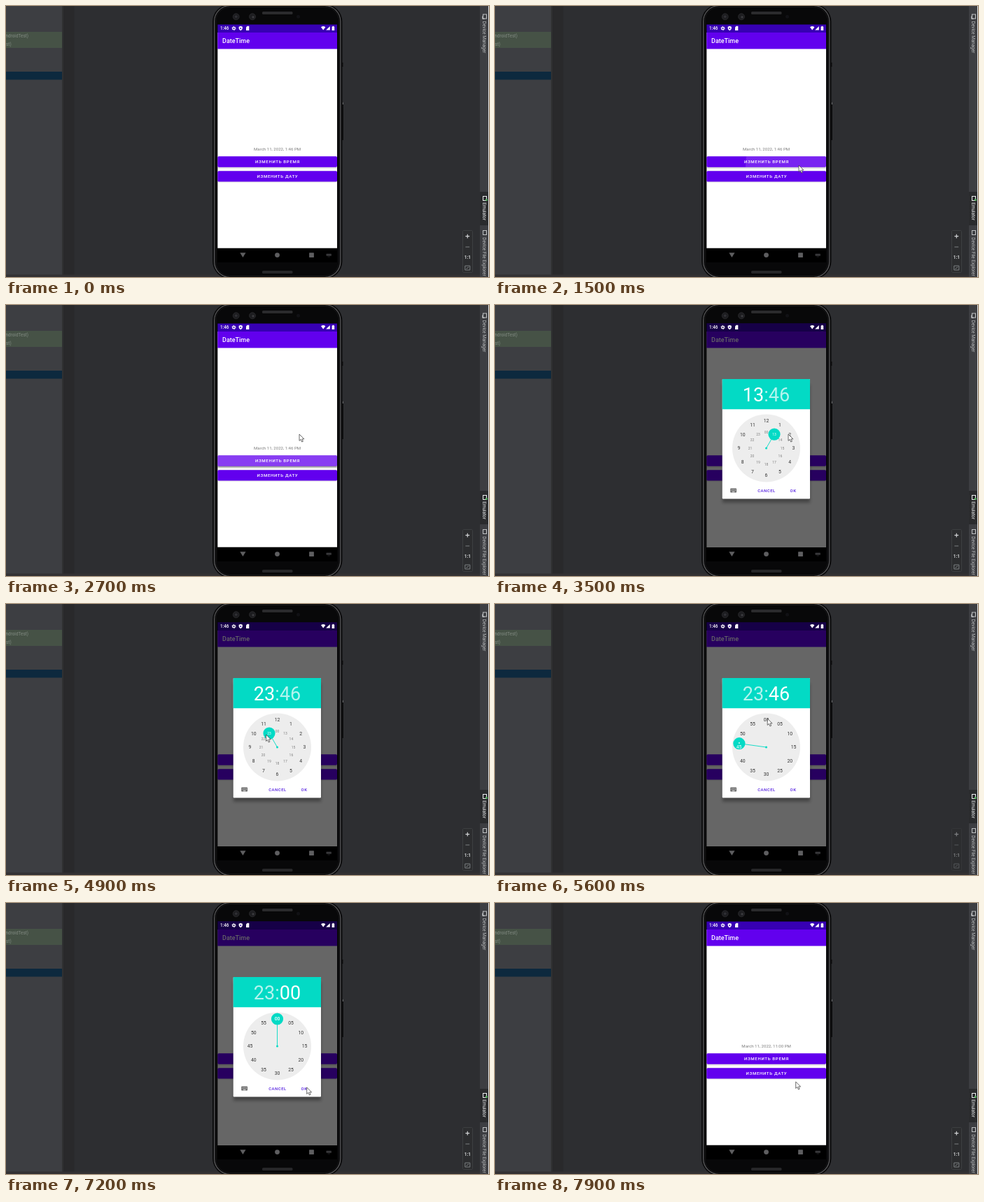
An HTML page for the animation above (8000 ms loop, 690 px wide and 388 px high).

```html
<!DOCTYPE html>
<html lang="ru">
<head>
<meta charset="utf-8">
<title>DateTime</title>
<style>
html, body { margin: 0; width: 100%; height: 100%; overflow: hidden; background: #2d2e31; }
svg { display: block; width: 690px; height: 388px; }
text { font-family: Roboto, sans-serif; }
.mid { text-anchor: middle; }
.btn { font-size: 6.1px; font-weight: 500; letter-spacing: .65px; fill: #fff; }
.act { font-size: 5.9px; font-weight: 500; letter-spacing: .57px; fill: #531de0; }
.ide { font-size: 6.4px; }
</style>
</head>
<body>
<svg viewBox="0 0 690 388" xmlns="http://www.w3.org/2000/svg">
  <defs>
    <clipPath id="stage"><rect width="690" height="388"/></clipPath>
    <clipPath id="btnClip"><rect x="302.3" y="215.3" width="170.7" height="15.4" rx="1.7"/></clipPath>
    <filter id="soft" x="-20%" y="-20%" width="140%" height="140%"><feGaussianBlur stdDeviation="2"/></filter>
    <filter id="soft1" x="-5%" y="-40%" width="110%" height="180%"><feGaussianBlur stdDeviation=".8"/></filter>
  </defs>
  <g clip-path="url(#stage)">
    <!-- IDE window -->
    <rect width="690" height="388" fill="#2d2e31"/>
    <rect width="80" height="388" fill="#3d3e42"/>
    <rect x="80" width="2" height="388" fill="#303132"/>
    <rect x="82" width="15.5" height="388" fill="#29292b"/>
    <rect y="37" width="80" height="23" fill="#465246"/>
    <rect y="94" width="80" height="11.5" fill="#0d293e"/>
    <text class="ide" x="32" y="45" text-anchor="end" fill="#818a82">ndroidTest)</text>
    <text class="ide" x="0" y="56.8" fill="#818a82">st)</text>
    <rect y="384.5" width="690" height="3.5" fill="#333133"/>
    <rect x="677" width="13" height="388" fill="#3d3e42"/>
    <rect x="677" y="266" width="13" height="48" fill="#2a2b2d"/>
    <g id="tabs"></g>
    <rect x="689" width="1" height="388" fill="#e4e4e4"/>
    <g id="zoom">
      <rect x="652.5" y="321.5" width="14" height="60" rx="1" fill="#2c2d2f" stroke="#3d3f41"/>
      <path d="M656.4 329.7h5.800M659.3 326.800v5.800" stroke="#d0d2d4" stroke-width="1.200"/>
      <path d="M656.4 345h5.800" stroke="#7d8082" stroke-width="1"/>
      <text class="mid" x="659.3" y="362.2" font-size="6.4" font-weight="700" fill="#d4d6d8">1:1</text>
      <path d="M655.8 372h7v6h-7zM657.5 376.300l3.600-2.600" fill="none" stroke="#7d8082" stroke-width="1"/>
    </g>

    <!-- phone -->
    <path d="M480 81h1.500v6h-1.500zM480 137h2v55h-2z" fill="#0e0e0f"/>
    <path d="M481.200 137.500v3.500" stroke="#8a8c8e"/>
    <rect x="295" y="-2.500" width="185.500" height="393" rx="25" fill="#0b0b0c"/>
    <rect x="297.600" y="-.5" width="180.200" height="389" rx="22.500" fill="#09090a" stroke="#5e5e60" stroke-width="1.200"/>
    <rect x="299.800" y="1.500" width="175.800" height="385" rx="20" fill="#080809" stroke="#1c1c1e" stroke-width=".8"/>
    <rect x="366" y="8" width="43.500" height="4" rx="1.500" fill="#2b2b2d"/>
    <rect x="366" y="379" width="43.500" height="4" rx="1.500" fill="#272729"/>
    <g fill="#1d1d20" stroke="#2c2c2f" stroke-width=".8">
      <circle cx="328.700" cy="15.300" r="4.500"/><circle cx="352" cy="15.300" r="4.500"/>
    </g>
    <circle cx="328.700" cy="15.300" r="1.800" fill="#303035"/>
    <circle cx="353" cy="15.800" r="1.600" fill="#3c3c40"/>
    <circle cx="417.500" cy="15.300" r="2.500" fill="#111115"/>

    <!-- app -->
    <rect x="302" y="26.500" width="171" height="340.500" fill="#000"/>
    <rect x="302.300" y="38" width="170.700" height="308.700" fill="#fff"/>
    <rect x="302.300" y="26.500" width="170.700" height="11.500" fill="#3700b3"/>
    <rect x="302.300" y="38" width="170.700" height="23.500" fill="#6200ee"/>
    <text x="309" y="53.200" font-size="9" font-weight="500" fill="#fff">DateTime</text>
    <text id="stamp" class="mid" x="387.600" y="206.600" font-size="6.1" fill="#7d7d7d"></text>
    <rect id="lift" x="302.300" y="217" width="170.700" height="15.500" fill="#000" filter="url(#soft1)"/>
    <rect x="302.300" y="236.800" width="170.700" height="15.200" rx="1.700" fill="#000" opacity=".18" filter="url(#soft1)"/>
    <g fill="#6200ee">
      <rect x="302.300" y="215.300" width="170.700" height="15.400" rx="1.700"/>
      <rect x="302.300" y="236.200" width="170.700" height="15.400" rx="1.700"/>
    </g>
    <circle id="ripple" cx="434" cy="228" fill="#fff" clip-path="url(#btnClip)"/>
    <text class="btn mid" x="388" y="225.300">ИЗМЕНИТЬ ВРЕМЯ</text>
    <text class="btn mid" x="388" y="246.200">ИЗМЕНИТЬ ДАТУ</text>

    <!-- time picker -->
    <g id="dialog">
      <rect x="302" y="26.500" width="171" height="320.200" opacity=".6"/>
      <rect x="325" y="114" width="125" height="169" opacity=".32" filter="url(#soft)"/>
      <rect x="324.700" y="106" width="125.300" height="171.500" rx="1" fill="#fff"/>
      <path d="M324.700 149.300v-42.300q0-1 1-1h123.300q1 0 1 1v42.300z" fill="#03dac5"/>
      <text class="mid" x="387.500" y="137.500" font-size="27" fill="#fff"><tspan id="hour"></tspan><tspan fill-opacity=".7">:</tspan><tspan id="minute"></tspan></text>
      <circle cx="387.500" cy="205" r="48.500" fill="#ededed"/>
      <g fill="#03dac5">
        <circle cx="387.500" cy="205" r="1.500"/>
        <line id="arm" x1="387.500" y1="205" stroke="#03dac5" stroke-width=".9"/>
        <circle id="knob" r="8.600"/>
        <circle id="dot" r=".9" fill="#fff"/>
      </g>
      <g id="hours"></g>
      <g id="minutes"></g>
      <rect x="336.200" y="262.600" width="8.800" height="6" rx=".8" fill="#686868"/>
      <path d="M337.400 264.300h6.600M337.400 265.900h6.600" stroke="#fff" stroke-width=".7" stroke-dasharray=".8 .65"/>
      <path d="M338.800 267.500h3.600" stroke="#fff" stroke-width=".7"/>
      <text class="act mid" x="388" y="267.600">CANCEL</text>
      <text class="act mid" x="426" y="267.600">OK</text>
    </g>

    <!-- system bars -->
    <text x="306" y="34.300" font-size="6.3" font-weight="500" fill="#fff">1:46</text>
    <g fill="#fff">
      <circle cx="325.500" cy="32" r="1.700" fill="none" stroke="#fff" stroke-width="1.300"/>
      <circle cx="325.500" cy="32" r="2.600" fill="none" stroke="#fff" stroke-width=".9" stroke-dasharray="1.360"/>
      <path d="M335.200 28.800l2.600 1v2.300q0 2-2.600 3.200-2.600-1.200-2.600-3.200v-2.300z"/>
      <circle cx="335.200" cy="32" r=".9" fill="#3700b3"/>
      <path d="M343 30.500l1.600-1.700h2.700v6.300h-4.300z"/>
      <path d="M450 30.300q3.200-2.500 6.400 0l-3.200 4.300zM462.800 29v5.600h-5.600zM465.600 29.600h1v-.8h1.600v.8h1v5.400h-3.600z"/>
    </g>
    <g fill="#5e5e60">
      <path d="M334.300 353.300h8.200l-4.100 6.600z"/>
      <circle cx="387.500" cy="356.600" r="3.400"/>
      <rect x="433.100" y="353.300" width="6.800" height="6.700" rx=".6"/>
    </g>
    <path d="M457.800 355h6.800v2.400h-6.800zM459.500 359h3.300" fill="#38383a" stroke="#38383a" stroke-width=".6"/>
    <path id="cursor" d="M0 0v9.400l2.200-2 1.500 3.600 1.700-.8-1.500-3.300h3z" fill="#fff" stroke="#3a3a3a" stroke-width=".75"/>
  </g>
</svg>
<script>
const $ = id => document.getElementById(id);
const set = (el, attrs) => { for (const k in attrs) el.setAttribute(k, attrs[k]); };
const show = (el, on) => { el.style.display = on ? '' : 'none'; };
const pad = n => String(n).padStart(2, '0');
const LOOP = 8000, CX = 387.5, CY = 205, OUTER = 39, INNER = 23;

function polar(deg, r) {
  const a = deg * Math.PI / 180;
  return [CX + r * Math.sin(a), CY - r * Math.cos(a)];
}

// Tool window tabs: [label, icon y, text y, colour]
$('tabs').innerHTML = [
  ['Device Manager', 15, 21.8, '#bfc1c3'],
  ['Emulator', 275.5, 281.3, '#eceef0'],
  ['Device File Explorer', 324.5, 331.2, '#bfc1c3']
].map(([label, iy, ty, c]) =>
  `<rect x="681.500" y="${iy - 3}" width="5" height="6" fill="none" stroke="${c}" stroke-width="1"/>
   <text class="ide" transform="translate(680.600 ${ty}) rotate(90)" fill="${c}">${label}</text>`
).join('') + '<circle cx="686.500" cy="277.500" r="1.600" fill="#4fae58"/><path d="M680.800 14.500v4h3" fill="none" stroke="#bfc1c3"/>';

// Dial labels
function addLabel(group, label, deg, r, size, fill) {
  const [x, y] = polar(deg, r);
  const el = document.createElementNS('http://www.w3.org/2000/svg', 'text');
  set(el, { class: 'mid', x, y: y + size * .355, 'font-size': size, fill });
  el.textContent = label;
  el.dataset.base = fill;
  group.append(el);
}
for (let i = 0; i < 12; i++) {
  addLabel($('hours'), i || 12, i * 30, OUTER, 6.8, '#333');
  addLabel($('hours'), i ? i + 12 : '00', i * 30, INNER, 5, '#808080');
  addLabel($('minutes'), pad(i * 5), i * 30, OUTER, 6.8, '#333');
}

// Pointer stops: [time, x, y]
const stops = [
  [1400, 434, 228], [1700, 428, 225], [1900, 416, 221], [2200, 404.5, 218],
  [2400, 409, 206], [2500, 412.5, 193], [2700, 419, 185], [4100, 382.5, 186],
  [4400, 371.5, 187], [5600, 389.2, 164], [6900, 403.5, 228],
  [7200, 429.7, 264], [7900, 429.7, 256]
];

function setHand(deg, r, dot) {
  const [x, y] = polar(deg, r), [x2, y2] = polar(deg, r - 8);
  set($('arm'), { x2, y2 });
  set($('knob'), { cx: x, cy: y });
  set($('dot'), { cx: x, cy: y - .8 });
  show($('dot'), dot);
}

function mark(group, label) {
  for (const el of group.children) {
    const on = el.textContent === label;
    set(el, { fill: on ? '#fff' : el.dataset.base, 'font-weight': on && label === '00' ? 500 : 400 });
  }
}

function render(t) {
  const stop = stops.filter(s => s[0] <= t).pop();
  show($('cursor'), stop);
  if (stop) set($('cursor'), { transform: `translate(${stop[1]} ${stop[2]})` });

  // Button press advances in 100 ms ticks
  const pressed = t >= 1400 && t < 3500;
  const tick = Math.min(8, Math.floor((t - 1400) / 100));
  show($('ripple'), pressed);
  if (pressed) set($('ripple'), { r: 20 + 56 * tick, opacity: Math.min(.24, .12 + .02 * tick) });
  set($('lift'), { opacity: pressed ? .15 + .04 * tick : .15 });

  $('stamp').textContent = `March 11, 2022, ${t < 7900 ? '1:46' : '11:00'} PM`;

  show($('dialog'), t >= 3500 && t < 7900);
  // The minute hand sits a little past the whole minute
  const hour = t < 4900 ? 13 : 23, minute = t < 6300 ? 46.3 : 0;
  const pickMinute = t >= 5600;
  $('hour').textContent = hour;
  $('minute').textContent = pad(Math.floor(minute));
  set($('hour'), { 'fill-opacity': pickMinute ? .7 : 1 });
  set($('minute'), { 'fill-opacity': pickMinute ? 1 : .7 });
  show($('hours'), !pickMinute);
  show($('minutes'), pickMinute);
  if (pickMinute) setHand(minute * 6, OUTER, minute % 5 > 0);
  else setHand(hour % 12 * 30, INNER, false);
  mark($('hours'), String(hour));
  mark($('minutes'), pad(Math.floor(minute / 5) * 5));

  set($('zoom'), { opacity: t >= 5600 && t < 6300 ? .5 : 1 });
}

const start = performance.now();
function frame() {
  render((performance.now() - start) % LOOP);
  requestAnimationFrame(frame);
}
frame();
</script>
</body>
</html>
```
